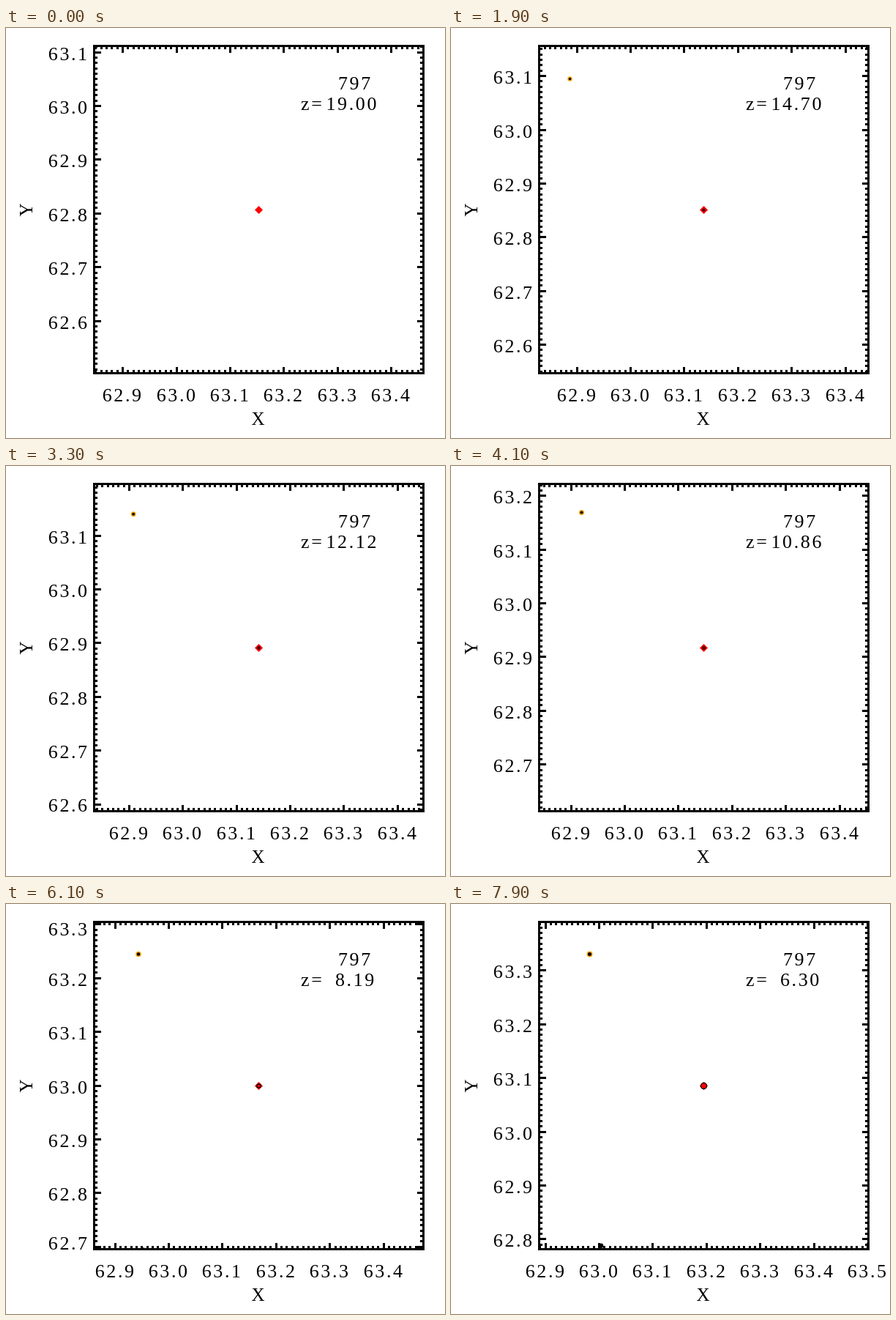
An HTML page that plays this animation: 600 px wide and 560 px high, repeating every 8 s.

```html
<!DOCTYPE html>
<html lang="en">
<head>
<meta charset="utf-8">
<title>Halo track</title>
<style>
  html, body { margin: 0; width: 100%; height: 100%; overflow: hidden; background: #fff; }
  svg { display: block; width: 600px; height: 560px; }
  text { font: 26px "Liberation Serif", "Times New Roman", serif; letter-spacing: 2.6px; white-space: pre; }
  .axis { font-size: 25px; letter-spacing: 0; text-anchor: middle; }
  .xl { text-anchor: middle; }
  .yl { text-anchor: end; }
  .ticks, .box { fill: none; stroke: #000; stroke-width: 3; shape-rendering: crispEdges; }
</style>
</head>
<body>
<svg viewBox="0 0 600 560">
  <clipPath id="inside"><rect x="119" y="23" width="453" height="450"/></clipPath>
  <path class="ticks" id="ticks"/>
  <rect class="box" x="120.5" y="24.5" width="450" height="447"/>
  <g id="labels"></g>
  <text class="axis" x="344.5" y="542">X</text>
  <text class="axis" transform="translate(36 248.5) rotate(-90)">Y</text>
  <text x="454" y="84">797</text>
  <text x="403" y="112">z=</text>
  <text id="z" y="112"></text>
  <g id="marks" clip-path="url(#inside)"></g>
</svg>
<script>
const STEP = 100, STEPS = 80;
const BOX = { l: 120.5, r: 570.5, t: 24.5, b: 471.5 };
const UNIT = 7.34;            // pixels per 0.01
const BORN = 10, LATE = 60;   // steps at which further halos appear

// key points: step, x and y of the 63.0 ticks, x and y of the companion
const PATH = [
  [0, 233, 106.5, 147, 73],
  [19, 245.5, 139, 162.5, 69.5],
  [41, 237.5, 187.5, 178.5, 63.5],
  [53, 228, 223, 172.5, 61],
  [61, 222.5, 248, 181, 68.5],
  [79, 202.5, 311, 189.5, 68.5]
];
const LAST = PATH.length - 1;

const el = id => document.getElementById(id);
const clamp = (v, lo, hi) => Math.min(hi, Math.max(lo, v));
const snap = v => Math.floor(v) + 0.5;

function slope(i, col) {
  const a = PATH[Math.max(0, i - 1)], b = PATH[Math.min(LAST, i + 1)];
  return (b[col] - a[col]) / (b[0] - a[0]);
}

// smooth curve through the key points
function track(n, col) {
  const i = Math.max(1, PATH.findIndex(p => p[0] >= n)) - 1;
  const a = PATH[i], b = PATH[i + 1];
  const h = b[0] - a[0], u = (n - a[0]) / h, w = 1 - u;
  return a[col] * (1 + 2 * u) * w * w + b[col] * (3 - 2 * u) * u * u
    + h * u * w * (slope(i, col) * w - slope(i + 1, col) * u);
}

function drawAxes(x0, y0) {
  let path = "", labels = "";
  const { l, r, t, b } = BOX;
  for (let i = -60; i <= 60; i++) {
    const major = i % 10 === 0, len = major ? 9 : 4.5;
    const x = snap(x0 + i * UNIT), y = snap(y0 - i * UNIT);
    const name = (63 + i / 100).toFixed(1);
    if (x > l && x < r) {
      path += `M${x} ${b}v${-len}M${x} ${t}v${len}`;
      if (major) labels += `<text class="xl" x="${x + 0.2}" y="510">${name}</text>`;
    }
    if (y > t && y < b) {
      path += `M${l} ${y}h${len}M${r} ${y}h${-len}`;
      if (major) labels += `<text class="yl" x="113.7" y="${clamp(y + 10, 43, 472)}">${name}</text>`;
    }
  }
  el("ticks").setAttribute("d", path);
  el("labels").innerHTML = labels;
}

const dot = (x, y, r, style = "") => `<circle cx="${x}" cy="${y}" r="${r}" ${style}/>`;

function drawMarks(n) {
  const u = n / (STEPS - 1);
  let out = '<path d="M345.5 243l5.5 5.5-5.5 5.5-5.5-5.5z" fill="#f00"/>';
  if (n >= BORN) {
    const x = track(n, 3), y = track(n, 4);
    out += dot(345.5, 248.5, 1.3 + 2.8 * u ** 3, 'fill="#f00" stroke="#000" stroke-width="1.3"');
    out += dot(x, y, 3 + u, 'fill="#ffa500"');
    out += dot(x, y, 1.5 + u);
  }
  if (n >= LATE) {
    const s = (n - LATE) / (STEPS - LATE);
    out += dot(187 + 19 * s, 471 - 4.5 * s, 1.5 + 1.8 * s);
  }
  el("marks").innerHTML = out;
}

function draw(n) {
  // the scale factor grows exponentially and carries four decimals
  const a = Math.exp(0.012759 * n - 2.99609).toFixed(4);
  const z = (1 / a - 1).toFixed(2);
  el("z").textContent = z;
  el("z").setAttribute("x", z < 10 ? 450 : 437.5);
  drawAxes(track(n, 1), track(n, 2));
  drawMarks(n);
}

const start = performance.now();
let shown = -1;
function tick() {
  const n = Math.floor((performance.now() - start) / STEP) % STEPS;
  if (n !== shown) draw(shown = n);
  requestAnimationFrame(tick);
}
tick();
</script>
</body>
</html>
```
